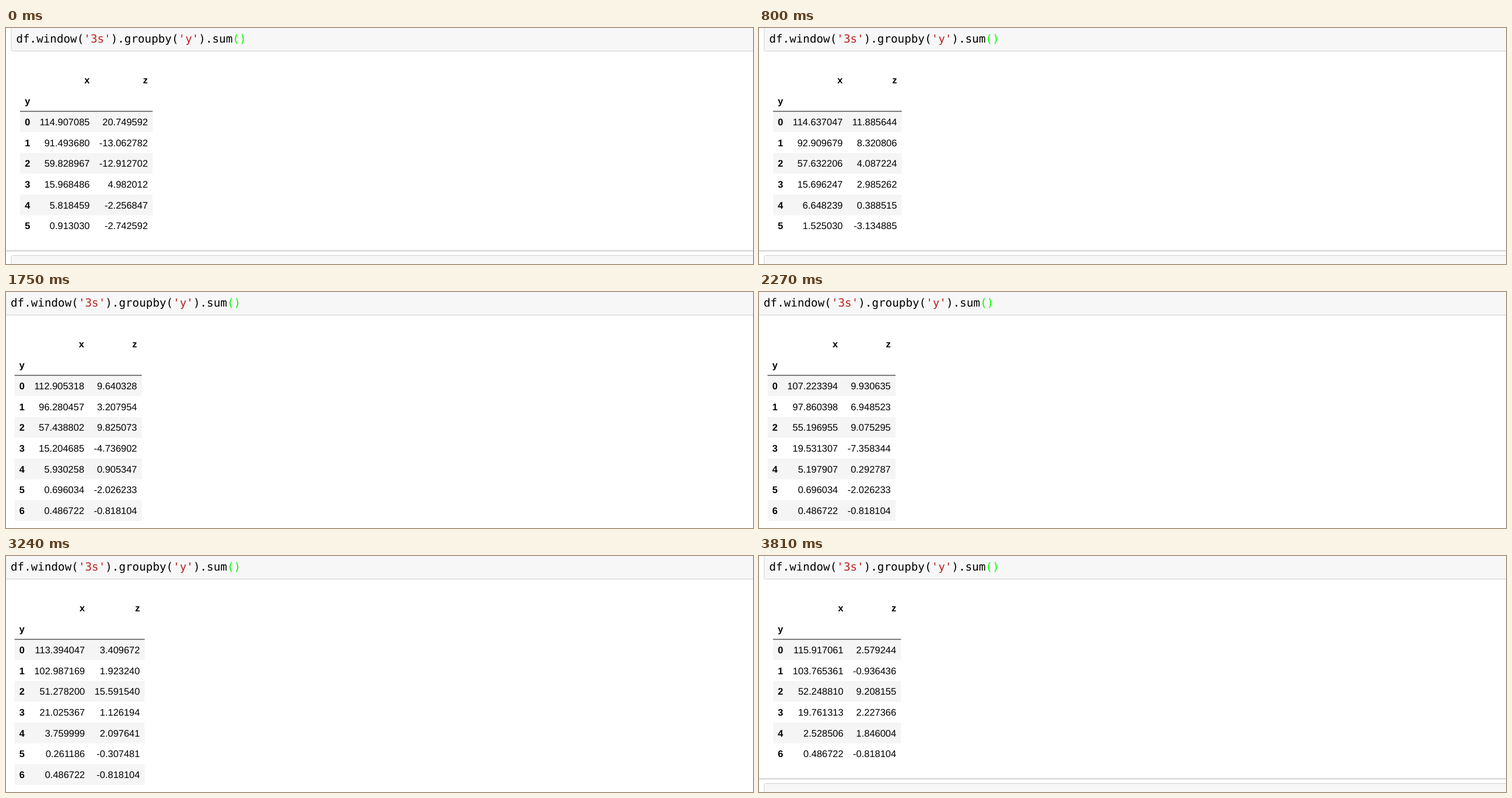
An HTML page for the animation above (3.93 s loop, 1280 by 405 pixels).

```html
<!DOCTYPE html>
<html lang="en">
<head>
<meta charset="utf-8">
<title>Streaming group-by</title>
<style>
  html, body { margin: 0; width: 100%; height: 100%; overflow: hidden; background: #fff; }
  svg { display: block; }
  text { font: 16.44px "Liberation Sans", Arial, sans-serif; text-rendering: geometricPrecision; white-space: pre; }
  .head { font-weight: bold; }
  .end { text-anchor: end; }
  .code { font: 19.26px "DejaVu Sans Mono", monospace; }
  .str { fill: #ba2121; }
  .match { fill: #0f0; }
  .cell { fill: #f7f7f7; stroke: #cfcfcf; }
</style>
</head>
<body>
<svg width="1280" height="405">
  <g id="page">
    <rect class="cell" x="9" y="-20" width="1400" height="59.5" rx="2.5"/>
    <text class="code" x="17.4" y="25">df.window(<tspan class="str">'3s'</tspan>).groupby(<tspan class="str">'y'</tspan>).sum<tspan class="match">()</tspan></text>
    <g id="table"></g>
    <g id="below">
      <rect x="-20" y="382" width="1400" height="1" fill="#ababab"/>
      <rect class="cell" x="9" y="390.5" width="1400" height="60" rx="2.5"/>
    </g>
  </g>
</svg>
<script>
const LOOP = 3930, EM = 16.44, ROW = 35.7, LEFT = 24, TOP = 143;

// Each update: start time, index labels, column x, column z
const updates = [
  [0, '012345',
    '114.907085 91.493680 59.828967 15.968486 5.818459 0.913030',
    '20.749592 -13.062782 -12.912702 4.982012 -2.256847 -2.742592'],
  [270, '012345',
    '114.268513 89.957204 60.214853 15.830629 6.273908 1.525030',
    '16.307258 -2.429163 -4.380527 3.640285 -0.927306 -3.134885'],
  [800, '012345',
    '114.637047 92.909679 57.632206 15.696247 6.648239 1.525030',
    '11.885644 8.320806 4.087224 2.985262 0.388515 -3.134885'],
  [1270, '0123456',
    '113.729466 94.045752 59.599573 11.991736 6.702134 1.525030 0.486722',
    '11.338734 -0.579737 11.915670 -2.153419 1.538184 -3.134885 -0.818104'],
  [1750, '0123456',
    '112.905318 96.280457 57.438802 15.204685 5.930258 0.696034 0.486722',
    '9.640328 3.207954 9.825073 -4.736902 0.905347 -2.026233 -0.818104'],
  [2270, '0123456',
    '107.223394 97.860398 55.196955 19.531307 5.197907 0.696034 0.486722',
    '9.930635 6.948523 9.075295 -7.358344 0.292787 -2.026233 -0.818104'],
  [2730, '0123456',
    '113.583557 97.793069 52.866164 20.119533 4.209305 0.696034 0.486722',
    '3.020514 -1.111570 16.555747 0.841946 3.325293 -2.026233 -0.818104'],
  [3240, '0123456',
    '113.394047 102.987169 51.278200 21.025367 3.759999 0.261186 0.486722',
    '3.409672 1.923240 15.591540 1.126194 2.097641 -0.307481 -0.818104'],
  [3770, '012346',
    '115.917061 103.765361 52.248810 19.761313 2.528506 0.486722',
    '2.579244 -0.936436 9.208155 2.227366 1.846004 -0.818104']
];

const $ = id => document.getElementById(id);
const pen = document.createElement('canvas').getContext('2d');
pen.font = `${EM}px "Liberation Sans", Arial, sans-serif`;
pen.textRendering = 'geometricPrecision';

const label = (s, x, y, cls = 'end') => `<text class="${cls}" x="${x}" y="${y}">${s}</text>`;
const widest = list => Math.max(...list.map(s => pen.measureText(s).width));

function drawTable([, labels, ...columns]) {
  const [xs, zs] = columns.map(c => c.split(' '));
  const first = LEFT + EM / 2;
  const xEnd = first + pen.measureText('0').width + EM + widest(xs);
  const zEnd = xEnd + EM + widest(zs);
  const width = zEnd + EM / 2 - LEFT;
  let out = label('x', xEnd, 94.9, 'head end') + label('z', zEnd, 94.9, 'head end') +
    label('y', first, 130.8, 'head');
  [...labels].forEach((name, i) => {
    const y = TOP + i * ROW, base = y + 23.9;
    if (i % 2 === 0) out += `<rect x="${LEFT}" y="${y}" width="${width}" height="${ROW}" fill="#f5f5f5"/>`;
    out += label(name, first, base, 'head') + label(xs[i], xEnd, base) + label(zs[i], zEnd, base);
  });
  out += `<rect x="${LEFT}" y="${TOP - .5}" width="${width}" height="1"/>`;
  $('table').innerHTML = out;
  $('below').setAttribute('transform', `translate(0 ${(labels.length - 6) * ROW})`);
}

let shown;
function frame() {
  const t = performance.now() % LOOP;
  const update = updates.findLast(u => u[0] <= t);
  if (update !== shown) drawTable(shown = update);
  // The page sits further left while the scrollbar is present
  const shift = t >= 1310 && t < 3810 ? -9.4 : 0;
  $('page').setAttribute('transform', `translate(${shift} 0)`);
  requestAnimationFrame(frame);
}
frame();
</script>
</body>
</html>
```
